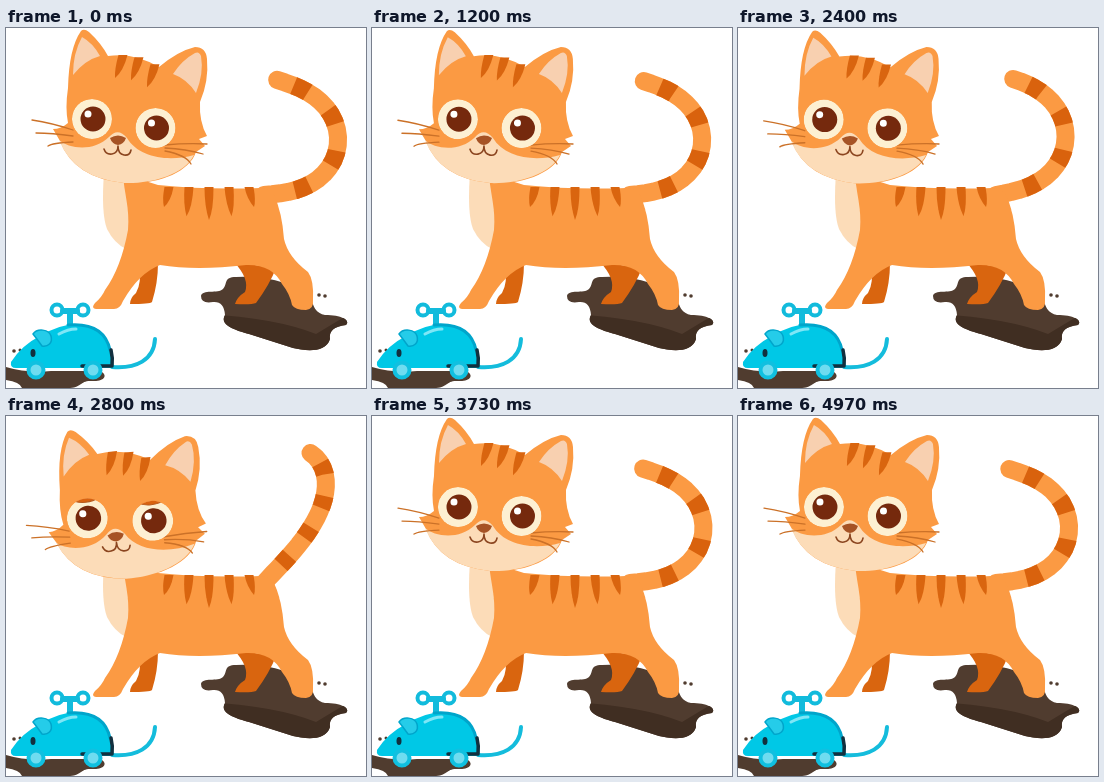
Write an HTML page that moves like this. It is 360x360 px and loops after 5 s.

```html
<!DOCTYPE html>
<html>
<head>
<meta charset="utf-8">
<style>
html, body { margin: 0; width: 100%; height: 100%; overflow: hidden; background: #fff; }
svg { display: block; width: 100%; height: 100%; }
.fur { fill: #fb9a43; }
.cream { fill: #fcdcb8; }
.dark { fill: #d9650f; }
.line { stroke-linecap: round; stroke-linejoin: round; }
</style>
</head>
<body>
<svg viewBox="0 0 360 360" fill="none">
  <defs>
    <path id="puddle" d="M195 268C196 261 212 266 217 261S217 249 230 249Q268 247 296 263C311 268 302 283 319 287C335 287 345 292 340 297Q322 299 324 311C320 325 300 323 287 320L243 306C229 302 213 297 219 287Q218 273 207 274Q195 276 195 268Z"/>
    <clipPath id="puddleClip"><use href="#puddle"/></clipPath>
    <clipPath id="eyeClip"><circle r="20"/></clipPath>
  </defs>

  <g fill="#503c2f">
    <use href="#puddle"/>
    <path clip-path="url(#puddleClip)" fill="#402e22" d="M200 286Q270 290 310 306L345 285V330H200Z"/>
    <circle cx="313" cy="267" r="1.800"/><circle cx="319" cy="268" r="1.800"/>
    <circle cx="8" cy="323" r="1.800"/><circle cx="14" cy="322" r="1.500"/>
    <path d="M0 339Q20 345 45 343H94C103 347 98 354 86 353S76 360 62 360H16Q14 354 0 352Z"/>
  </g>

  <g class="line">
    <path stroke="#14bcdc" stroke-width="4" d="M106 339C130 341 148 332 149 311"/>
    <g stroke="#12bbdc" stroke-width="4">
      <circle cx="51" cy="282" r="5.500"/><circle cx="77" cy="282" r="5.500"/>
      <path d="M57 283H71M64 283V300" stroke-width="6"/>
    </g>
    <path fill="#00c8e6" d="M5 334Q16 317 34 308Q58 293 80 297Q105 304 108 340H10Q4 340 5 334Z"/>
    <path stroke="#00a5cb" stroke-width="3" d="M62 297Q98 294 104 322"/>
    <path stroke="#12303f" stroke-width="3.500" d="M76 338H106Q107 330 105 322"/>
    <path stroke="#7fe6f6" stroke-width="3" d="M53 306Q62 301 70 301"/>
    <path fill="#25cce9" stroke="#00a5cb" stroke-width="1.500" d="M27 306C31 300 43 301 45 308S42 319 36 318Q31 311 27 306Z"/>
    <ellipse cx="27" cy="325" rx="2.500" ry="4" fill="#12303f"/>
    <g fill="#6fdcf0" stroke="#10c0e0" stroke-width="4">
      <circle cx="30" cy="342" r="7.500"/><circle cx="87" cy="342" r="7.500"/>
    </g>
  </g>

  <g stroke-width="18" stroke-linejoin="round">
    <path id="tail" stroke="#fb9a43" stroke-linecap="round"/>
    <path id="rings" stroke="#d9620d" pathLength="100" stroke-dasharray="0 16 8 15 8 14 8 14 8 100"/>
  </g>

  <g id="body">
    <path class="dark" d="M133 235H152Q152 255 146 274Q144 276 124 276Q124 270 130 265Q136 255 133 235Z"/>
    <path class="dark" d="M228 234L270 240Q264 256 250 275Q245 277 229 276Q231 269 239 264Q244 251 228 234Z"/>
    <path class="cream" d="M98 145Q95 185 101 201Q108 215 120 221L130 150Z"/>
    <path class="fur" d="M117 146C118 165 124 180 122 202Q115 240 99 262Q96 269 89 275Q84 281 92 281H108Q114 281 117 273Q133 245 154 237Q190 243 240 237Q266 236 276 256Q284 266 286 277Q289 282 300 282Q308 281 307 272Q308 252 302 244Q282 229 278 211Q276 184 268 167Q264 160 255 160Q200 162 152 157Z"/>
  </g>

  <g id="head">
    <path class="fur" d="M62 60Q63 20 75 3Q78 0 83 4Q95 15 102 28Q128 24 153 39Q172 23 189 19Q200 19 201 31Q203 53 194 74Q193 94 201 108L193 111L199 118L190 124C183 145 150 157 118 155Q68 150 54 113L47 101Q55 101 62 95Q59 80 62 60Z"/>
    <path class="cream" d="M53 112C63 121 88 124 103 109Q112 99 121 110C133 130 163 134 188 127C178 147 145 156 118 155Q68 150 53 112Z"/>
    <path fill="#f8d0b0" d="M76 9Q67 25 67 47Q79 32 94 28Q87 15 76 9ZM189 25Q176 32 167 46Q181 51 190 65Q198 45 195 28Q193 23 189 25Z"/>
    <path id="whiskers" class="line" stroke="#cb7128" stroke-width="1.300"/>
    <g id="eyes"/>
    <path fill="#a65325" d="M104 110Q112 105 120 110Q118 116 112 117Q106 116 104 110Z"/>
    <path class="line" stroke="#8b451f" stroke-width="1.600" d="M98 121Q100 127 106 126T112 118Q112 126 118 127T125 122"/>
  </g>
</svg>
<script>
const CYCLE = 1250, SEGMENTS = 24;
const $ = id => document.getElementById(id);
const mix = (a, b, k) => a + (b - a) * k;
const clamp = x => Math.min(1, Math.max(0, x));
const smooth = x => x * x * (3 - 2 * x);

const add = (id, markup) => $(id).insertAdjacentHTML('beforeend', markup);

// A tapered stripe hanging from (x, y)
const stripe = (x, y, w, length, lean) =>
  `<path class="dark" d="M${x - w / 2} ${y}h${w}Q${x + w / 2 + lean / 2} ${y + length * .7} ${x + lean} ${y + length}Q${x - w / 2 + lean / 2} ${y + length * .6} ${x - w / 2} ${y}Z"/>`;

for (let i = 0; i < 5; i++)
  add('body', stripe(163 + 20 * i, 159, 9, 20 + 13 * Math.sin(Math.PI * i / 4), 2.5 * i - 5));
for (let i = 0; i < 3; i++)
  add('head', stripe(117 + 16 * i, 27 + 2.3 * i * i, 9, 23, -8));

let whiskers = '';
for (let i = 0; i < 3; i++) {
  whiskers += `M67 ${102 + 6 * i}Q46 ${95 + 10 * i} ${26 + 4 * i * i} ${92 + 13 * i}`;
  whiskers += `M159 ${117 + 3 * i}Q180 ${115 + 6 * i} ${201 - 4 * i * i} ${116 + 10 * i}`;
}
$('whiskers').setAttribute('d', whiskers);

for (const [x, y] of [[86, 91], [149.5, 100]])
  add('eyes', `<g transform="translate(${x} ${y})" clip-path="url(#eyeClip)">
    <circle r="20" fill="#fdf0d2"/><circle cx="1" r="12.500" fill="#75290d"/>
    <circle cx="-4" cy="-5" r="3.500" fill="#fff"/>
    <ellipse class="lid" rx="25" ry="22" fill="#d9620f" stroke="#b75a1c"/></g>`);
const lids = document.querySelectorAll('.lid');

// The base lifts early, the tip uncurls last
function tailPath(k) {
  const step = mix(195, 133, k) / SEGMENTS;
  let x = 258, y = 167, d = `M${x} ${y}`;
  for (let i = 0; i < SEGMENTS; i++) {
    const s = (i + .5) / SEGMENTS;
    const curled = -5 - 157 * smooth(s), raised = -66 + 36 * s;
    const lift = mix(smooth(k), k ** 5, s ** 4);
    const angle = mix(curled, raised, lift) * Math.PI / 180;
    x += step * Math.cos(angle);
    y += step * Math.sin(angle);
    d += `L${x} ${y}`;
  }
  return d;
}

function draw(now) {
  const p = now % CYCLE / CYCLE;
  const nod = Math.sin(Math.PI * p ** .8) ** 2;
  const lid = clamp(1.3 - 3.9 * Math.abs(p - .54));

  $('head').setAttribute('transform',
    `translate(${112 - 3 * nod} ${112 + 12 * nod}) rotate(${-8 * nod}) scale(${1 + .03 * nod} 1) translate(-112 -112)`);

  const d = tailPath(Math.sin(Math.PI * p) ** 1.2);
  $('tail').setAttribute('d', d);
  $('rings').setAttribute('d', d);

  for (const el of lids) el.setAttribute('cy', -44 * (1 - lid));
}

function loop() {
  draw(performance.now());
  requestAnimationFrame(loop);
}
loop();
</script>
</body>
</html>
```
